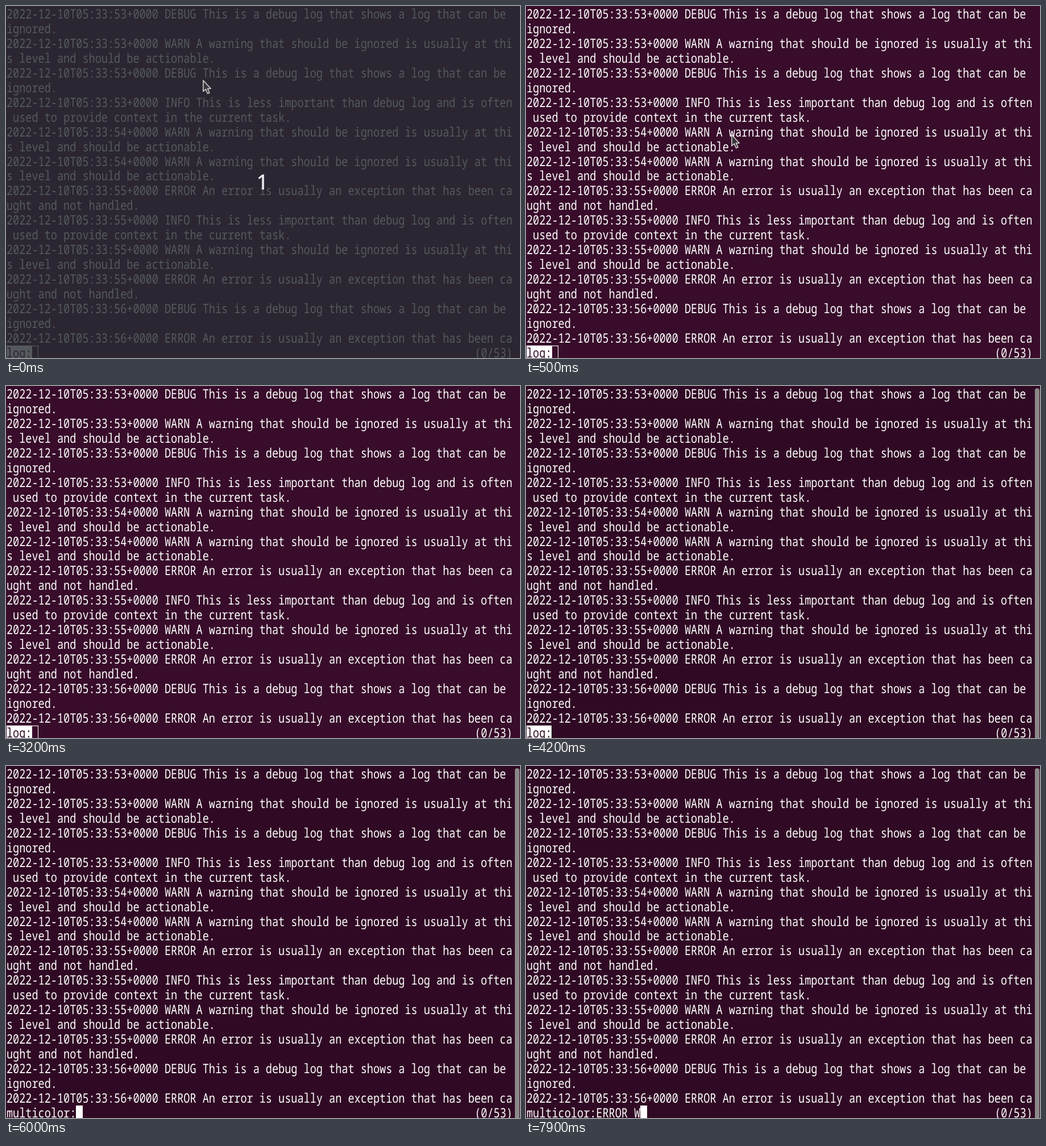
These frames come from a looping animation (904 by 620 pixels, 8 s). An HTML page:

```html
<!DOCTYPE html>
<html lang="en">
<head>
<meta charset="utf-8">
<title>Log viewer</title>
<style>
  html, body { margin: 0; width: 100%; height: 100%; overflow: hidden; }
  .stage {
    position: relative; width: 904px; height: 620px; overflow: hidden;
    background: #380c2a;
  }
  .stage, .stage * { animation: 8s step-end infinite; }
  .stage { animation-name: focus; }

  /* tall, narrow terminal face: 80 columns by 24 rows;
     whole-pixel rows keep every baseline evenly spaced */
  .pane {
    --col: .6em;
    position: absolute; left: 1.4px; top: 1.1px; width: 902px;
    transform: scaleY(1.2357); transform-origin: 0 0;
    font: 18.54px/21px "Noto Sans Mono", monospace;
    font-variant-ligatures: none; text-rendering: geometricPrecision;
    white-space: pre; color: #fff;
  }
  pre { margin: 0; font: inherit; }
  .status { position: relative; height: 21px; }
  .count { position: absolute; left: calc(74 * var(--col)); }

  .input { position: absolute; left: 0; top: 0; height: 100%; animation-name: type; }
  .input span { position: absolute; left: 0; top: 0; width: 100%; height: 100%; overflow: hidden; }
  .input .mode { background: #fff; color: #300a24; animation-name: mode; }
  .input .query { animation-name: query; }
  .input .caret {
    left: 100%; width: var(--col); box-sizing: border-box;
    border: 1px solid #fff; animation-name: caret;
  }

  .bar {
    position: absolute; left: 895px; top: 4px; width: 8px; height: 630px;
    border-radius: 4px; background: #8b8889; animation-name: bar;
  }
  .shade { position: absolute; inset: 0; background: rgba(40, 45, 51, .79); animation-name: intro; }
  .digit {
    position: absolute; left: 401px; top: 285px; width: 100px;
    font: 36px/50px "Noto Sans", sans-serif; text-align: center;
    color: #ece8ee; -webkit-text-stroke: .6px #ece8ee; animation-name: intro;
  }
  .pointer { position: absolute; left: 0; top: 0; overflow: visible; animation-name: point; }

  @keyframes focus { 0% { background: #380c2a } 46.25%, 100% { background: #300a24 } }
  @keyframes bar   { 0% { opacity: 0 } 46.25%, 100% { opacity: 1 } }
  @keyframes intro { 0% { opacity: 1 } 1.25%, 100% { opacity: 0 } }
  @keyframes mode  { 0% { opacity: 1 } 61.25%, 100% { opacity: 0 } }
  @keyframes query { 0% { opacity: 0 } 61.25%, 100% { opacity: 1 } }

  @keyframes type {
    0%     { width: calc(4 * var(--col)) }
    61.25% { width: calc(11 * var(--col)) }
    78.75% { width: calc(12 * var(--col)) }
    83.75% { width: calc(13 * var(--col)) }
    86.25% { width: calc(14 * var(--col)) }
    87.5%  { width: calc(15 * var(--col)) }
    90%    { width: calc(16 * var(--col)) }
    93.75% { width: calc(17 * var(--col)) }
    98.75%, 100% { width: calc(18 * var(--col)) }
  }

  /* outline while unfocused, then a blinking block */
  @keyframes caret {
    0%     { background: transparent; opacity: 1 }
    46.25% { background: #fff; opacity: 1 }
    52.5%  { background: #fff; opacity: 0 }
    60%    { background: #fff; opacity: 1 }
    68.75% { background: #fff; opacity: 0 }
    75%, 100% { background: #fff; opacity: 1 }
  }

  @keyframes point {
    0%     { transform: translate(346px, 130px); opacity: 1 }
    2.5%   { transform: translate(348px, 144px); opacity: 1 }
    3.75%  { transform: translate(352px, 172px); opacity: 1 }
    5%     { transform: translate(357px, 204px); opacity: 1 }
    6.25%  { transform: translate(361px, 226px); opacity: 1 }
    35%    { transform: translate(350px, 208px); opacity: 1 }
    36.25% { transform: translate(382px, 152px); opacity: 1 }
    37.5%  { transform: translate(440px, 76px); opacity: 1 }
    38.75% { transform: translate(498px, 6px); opacity: 1 }
    40%, 100% { transform: translate(520px, -40px); opacity: 0 }
  }
</style>
</head>
<body>
<div class="stage">
  <div class="pane"><pre>2022-12-10T05:33:53+0000 DEBUG This is a debug log that shows a log that can be 
ignored.
2022-12-10T05:33:53+0000 WARN A warning that should be ignored is usually at thi
s level and should be actionable.
2022-12-10T05:33:53+0000 DEBUG This is a debug log that shows a log that can be 
ignored.
2022-12-10T05:33:53+0000 INFO This is less important than debug log and is often
 used to provide context in the current task.
2022-12-10T05:33:54+0000 WARN A warning that should be ignored is usually at thi
s level and should be actionable.
2022-12-10T05:33:54+0000 WARN A warning that should be ignored is usually at thi
s level and should be actionable.
2022-12-10T05:33:55+0000 ERROR An error is usually an exception that has been ca
ught and not handled.
2022-12-10T05:33:55+0000 INFO This is less important than debug log and is often
 used to provide context in the current task.
2022-12-10T05:33:55+0000 WARN A warning that should be ignored is usually at thi
s level and should be actionable.
2022-12-10T05:33:55+0000 ERROR An error is usually an exception that has been ca
ught and not handled.
2022-12-10T05:33:56+0000 DEBUG This is a debug log that shows a log that can be 
ignored.
2022-12-10T05:33:56+0000 ERROR An error is usually an exception that has been ca</pre><div class="status"><div class="input"><span class="mode">log:</span><span class="query">multicolor:ERROR W</span><span class="caret"></span></div><div class="count">(0/53)</div></div></div>
  <div class="bar"></div>
  <div class="shade"></div>
  <div class="digit">1</div>
  <svg class="pointer" width="16" height="26">
    <path d="M.8 1V20.5L5.2 16.6 8.6 24.2 11.8 22.8 8.5 15.4H14.2Z"
      fill="#3b383d" stroke="#d8d6d6" stroke-width="1.5" stroke-linejoin="round"/>
  </svg>
</div>
</body>
</html>
```
